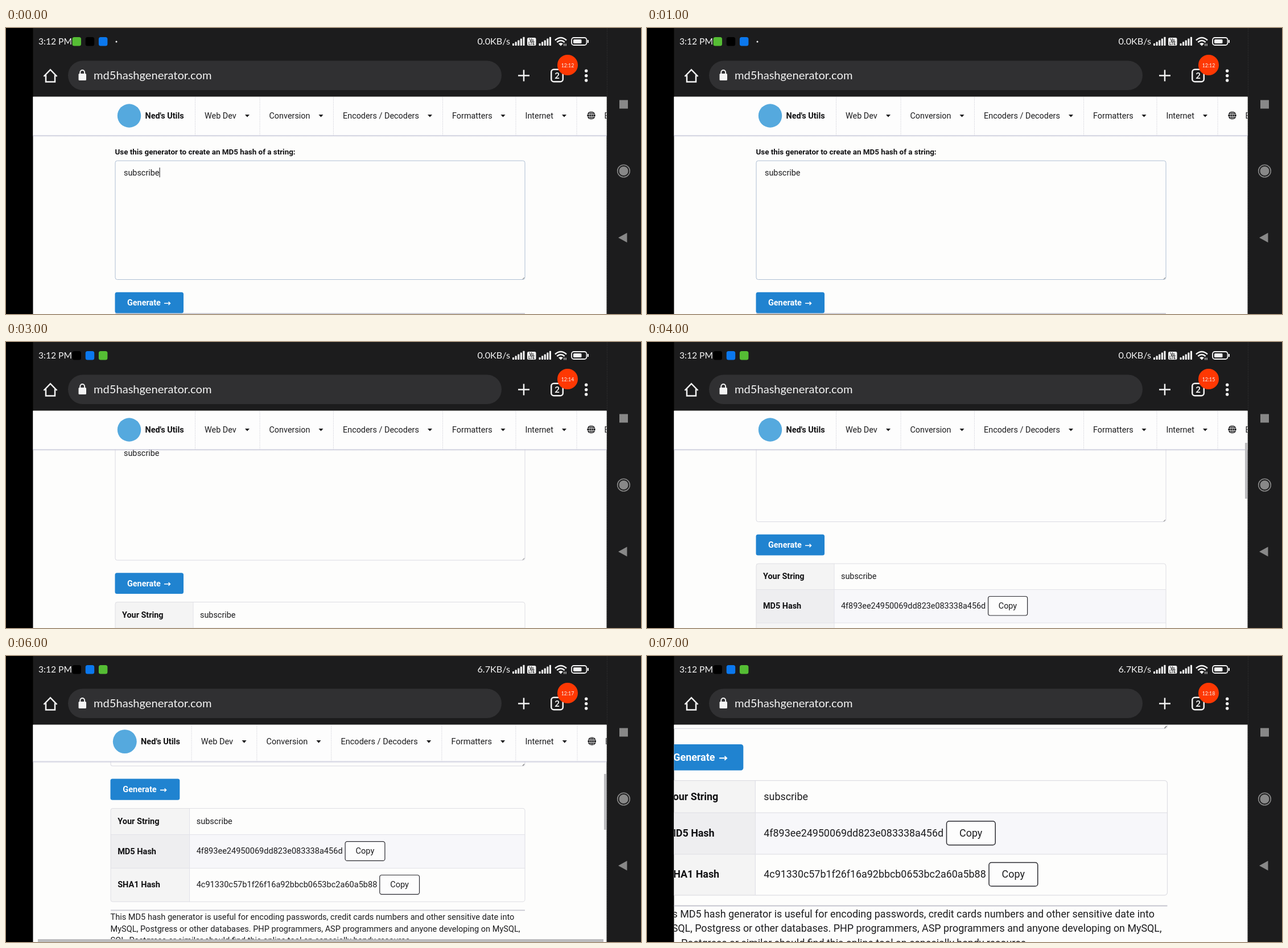
These frames come from a looping animation (1116 px wide and 502 px high, 8 s). An HTML page:

```html
<!DOCTYPE html>
<html lang="en">
<head>
<meta charset="utf-8">
<title>MD5 hash generator</title>
<style>
  html, body { margin: 0; width: 100%; height: 100%; overflow: hidden; background: #000; }
  svg { display: block; width: 1116px; height: 502px; }
  .page { font: 14.4px Roboto, sans-serif; fill: #1c1c1e; }
  .bold { font-weight: 700; fill: #101012; }
  .ui { font-family: Lato, sans-serif; fill: #f4f4f4; }
  .line { fill: none; stroke: #f2f2f2; }
</style>
</head>
<body>
<svg viewBox="0 0 1116 502" xmlns="http://www.w3.org/2000/svg">
  <defs>
    <clipPath id="view"><rect x="47.5" y="121" width="1008" height="381"/></clipPath>
    <linearGradient id="shade" x2="0" y2="1">
      <stop offset="0" stop-color="#c9cadb"/>
      <stop offset="1" stop-color="#c9cadb" stop-opacity="0"/>
    </linearGradient>
  </defs>

  <rect width="1116" height="502"/>
  <rect x="47.5" width="1068.5" height="502" fill="#1c1c1d"/>
  <path d="M1056.5 0V502" stroke="#3a3a3a" stroke-dasharray="1 2"/>
  <rect x="47.5" y="120.5" width="1008" height="381.5" fill="#fdfdfc"/>

  <g clip-path="url(#view)">
    <g id="page" class="page">
      <g id="content"></g>
      <g id="nav"></g>
    </g>
    <g id="bars" fill="#bcbcbe"></g>
  </g>

  <!-- status bar -->
  <g class="ui">
    <text x="57" y="29" font-size="15.6">3:12 PM</text>
    <text id="speed" x="886" y="29" font-size="16.2" text-anchor="end"></text>
    <g id="apps"></g>
    <g id="signal"></g>
    <rect x="916" y="17" width="15.5" height="14" rx="2.5"/>
    <g fill="#1c1c1d" font-size="7" font-weight="700" text-anchor="middle">
      <text x="923.7" y="23.6">Vo</text><text x="923.7" y="30">LTE</text>
    </g>
    <g class="line" stroke-width="2.4">
      <path d="M965 21.5Q975 12.5 985 21.5M968.3 25Q975 19 981.7 25"/>
      <rect x="994" y="17" width="26.5" height="13" rx="4" stroke-width="1.8"/>
    </g>
    <path d="M971 27.5Q975 24.3 979 27.5L975 31.5ZM1021.8 21h2.2v5h-2.2z"/>
    <path d="M981 27.5v4M984 27.5v4" stroke="#f2f2f2" stroke-width="1.2"/>
    <rect x="997" y="20" width="14.5" height="7" rx="1.5"/>
  </g>

  <!-- browser bar -->
  <rect x="109" y="57.5" width="762" height="51.5" rx="25.7" fill="#303032"/>
  <g class="line" stroke-width="2.5">
    <path d="M66.5 85L78 73.2L89.500 85M70 82.500V94.500H86V82.500"/>
    <path d="M130.300 81v-3a3.900 3.900 0 0 1 7.800 0v3" stroke-width="2"/>
    <path d="M900 83.500h20M910 73.500v20"/>
    <rect x="958.300" y="72.800" width="20.500" height="21.400" rx="4.500"/>
  </g>
  <g class="ui">
    <rect x="127.500" y="80" width="13.500" height="12" rx="1.500"/>
    <text x="154" y="90" font-size="20.1">md5hashgenerator.com</text>
    <text x="968.500" y="89" font-size="15" font-weight="700" text-anchor="middle">2</text>
    <circle cx="1019.700" cy="75.300" r="2.700"/>
    <circle cx="1019.700" cy="83.700" r="2.700"/>
    <circle cx="1019.700" cy="92" r="2.700"/>
    <circle cx="987" cy="65" r="18" fill="#fe3803"/>
    <text id="clock" x="987" y="68.500" font-size="8.800" text-anchor="middle"></text>
  </g>

  <!-- system buttons -->
  <g fill="#888">
    <rect x="1078" y="126.500" width="15" height="15"/>
    <circle cx="1085.500" cy="251" r="8"/>
    <circle cx="1085.500" cy="251" r="10.800" fill="none" stroke="#888" stroke-width="1.600"/>
    <path d="M1076 368L1091.500 359.500V376.500Z"/>
  </g>
</svg>
<script>
const STEP = 1000, LOOP = 8000;
const $ = id => document.getElementById(id);

const text = (x, y, s, attrs = '') => `<text x="${x}" y="${y + 5}" ${attrs}>${s}</text>`;
const bold = (x, y, s, attrs = '') => text(x, y, s, 'class="bold" ' + attrs);
const rect = (x, y, w, h, attrs = '') =>
  `<rect x="${x}" y="${y}" width="${w}" height="${h}" ${attrs}/>`;
const path = (d, attrs) => `<path d="${d}" ${attrs}/>`;

// zoom: scale k, moving page point (x, y) to (toX, toY)
const zoom = (k, x, y, toX, toY) => `translate(${toX} ${toY}) scale(${k}) translate(${-x} ${-y})`;
const ZOOM_A = zoom(1.0111, 912, 502, 912, 502);
const ZOOM_B = zoom(1.242, 912, 447, 914.5, 438.5);

// y is the centre of the Generate button, bar the top of the scroll thumb
const states = [
  { y: 482, clock: 12, caret: true, focus: true },
  { y: 482, clock: 12, focus: true },
  { y: 423.5, clock: 13, focus: true, pressed: true },
  { y: 423.5, clock: 14, done: true },
  { y: 356, clock: 15, done: true, bar: 177 },
  { y: 237, clock: 16, done: true, bar: 207, busy: true },
  { y: 237, clock: 17, done: true, bar: 207, busy: true, wide: true, zoom: ZOOM_A },
  { y: 237, clock: 18, done: true, busy: true, zoom: ZOOM_B }
];

const about = [
  'This MD5 hash generator is useful for encoding passwords, credit cards numbers and other sensitive date into',
  'MySQL, Postgress or other databases. PHP programmers, ASP programmers and anyone developing on MySQL,',
  'SQL, Postgress or similar should find this online tool an especially handy resource.'
];

function copyButton(x, y) {
  return rect(x + .6, y - 16.5, 69, 33.5, 'rx="3.5" fill="#fdfdfd" stroke="#2a2a30" stroke-width="1.2"') +
    text(x + 35, y, 'Copy', 'text-anchor="middle"');
}

function table(y) {
  const top = y + 33;
  const lines = `M192 ${top + 45.5}H912M192 ${top + 104}H912M329 ${top}v162`;
  return rect(192, top, 137, 162, 'fill="#f4f4f4"') +
    rect(329, top + 45.5, 583, 58.5, 'fill="#f7f7fa"') +
    rect(192, top + 45.5, 137, 58.5, 'fill="#eeeef0"') +
    path(lines, 'stroke="#e2e2e8"') +
    rect(192, top, 720, 162, 'rx="4" fill="none" stroke="#dedee3"') +
    bold(204, y + 55.3, 'Your String') + text(341, y + 55.3, 'subscribe') +
    bold(204, y + 107.3, 'MD5 Hash') + text(341, y + 107, '4f893ee24950069dd823e083338a456d') +
    copyButton(599, y + 107) +
    bold(204, y + 165.5, 'SHA1 Hash') + text(341, y + 165.3, '4c91330c57b1f26f16a92bbcb0653bc2a60a5b88') +
    copyButton(659, y + 165.3);
}

function content({ y, caret, focus, pressed, done }) {
  const rule = y + (done ? 210 : 19.3);
  const first = y + (done ? 221.3 : 30.8);
  return bold(191.5, y - 264.7, 'Use this generator to create an MD5 hash of a string:', 'font-size="13.4"') +
    rect(192, y - 249, 720, 208.5, `rx="3.5" fill="#fdfdfc" stroke="${focus ? '#aebfd3' : '#dadae2'}"`) +
    path(`M911 ${y - 44}l-3 3`, 'stroke="#666"') +
    text(207, y - 228.5, 'subscribe') +
    (caret ? rect(269.5, y - 237, 1.1, 17) : '') +
    path(`M192 ${rule}H912`, 'stroke="#c6c6d0" stroke-width="1.6"') +
    rect(191.5, y - 18.3, 120.5, 36.8, `rx="3.5" fill="${pressed ? '#1967a8' : '#2083d0'}"`) +
    text(213, y, 'Generate', 'font-weight="700" fill="#fff"') +
    path(`M278 ${y + 1.3}h10.500m-3 -2.800l3 2.800l-3 2.800`, 'fill="none" stroke="#fff" stroke-width="1.5"') +
    (done ? table(y) : '') +
    about.map((s, i) => text(191.5, first + i * 20.5, s)).join('');
}

function nav() {
  const items = [
    ['Web Dev', 349, 424], ['Conversion', 462.5, 553.5], ['Encoders / Decoders', 592, 745],
    ['Formatters', 784, 873.5], ['Internet', 912.5, 981]
  ];
  const seps = [332.5, 446, 575.5, 767.5, 896, 1003].map(x => `M${x} 121V188`).join('');
  return rect(0, 100, 1160, 88.5, 'fill="#fdfdfd"') +
    rect(0, 188, 1160, 3.5, 'fill="url(#shade)"') +
    path(seps, 'stroke="#dcdce2" stroke-dasharray="2 1"') +
    '<circle cx="216.5" cy="154" r="20.7" fill="#55a9de"/>' +
    bold(244.5, 153.5, "Ned's Utils") +
    items.map(([s, x, c]) => text(x, 153.5, s) + path(`M${c - 4} 152h8l-4 4.500z`)).join('') +
    '<circle cx="1028.5" cy="153.5" r="7.2"/>' +
    path('M1021 151.300h15M1021 155.700h15M1028.500 146v15M1026.500 146.500q-3 7 0 14M1030.500 146.500q3 7 0 14',
      'fill="none" stroke="#fdfdfd" stroke-width=".8"') +
    text(1051.5, 153.5, 'English');
}

function apps(done) {
  const green = '#55bd34', black = '#000', blue = '#0b78ee';
  const order = done ? [black, blue, green] : [green, black, blue];
  return order.map((c, i) => rect(116.5 + i * 23.2, 16, 15.5, 15.5, `rx="3.5" fill="${c}"`)).join('') +
    (done ? '' : '<circle cx="194" cy="24" r="1.5"/>');
}

function signal(x) {
  let out = '';
  for (let i = 0; i < 5; i++) {
    const h = 4 + i * 2.8;
    out += rect(x + i * 4.6, 31 - h, 3.1, h, 'rx=".8"');
  }
  return out;
}

function show(s) {
  $('content').innerHTML = content(s);
  $('page').setAttribute('transform', s.zoom || '');
  $('bars').innerHTML = (s.bar ? rect(1051, s.bar, 4.5, 98) : '') +
    (s.wide ? rect(56, 497, 994, 5) : '');
  $('apps').innerHTML = apps(s.done);
  $('speed').textContent = s.busy ? '6.7KB/s' : '0.0KB/s';
  $('clock').textContent = '12:' + s.clock;
}

$('nav').innerHTML = nav();
$('signal').innerHTML = signal(890) + signal(936.5);

const start = performance.now();
let shown = -1;
function tick() {
  const i = Math.floor(((performance.now() - start) % LOOP) / STEP);
  if (i !== shown) show(states[shown = i]);
  requestAnimationFrame(tick);
}
tick();
</script>
</body>
</html>
```
